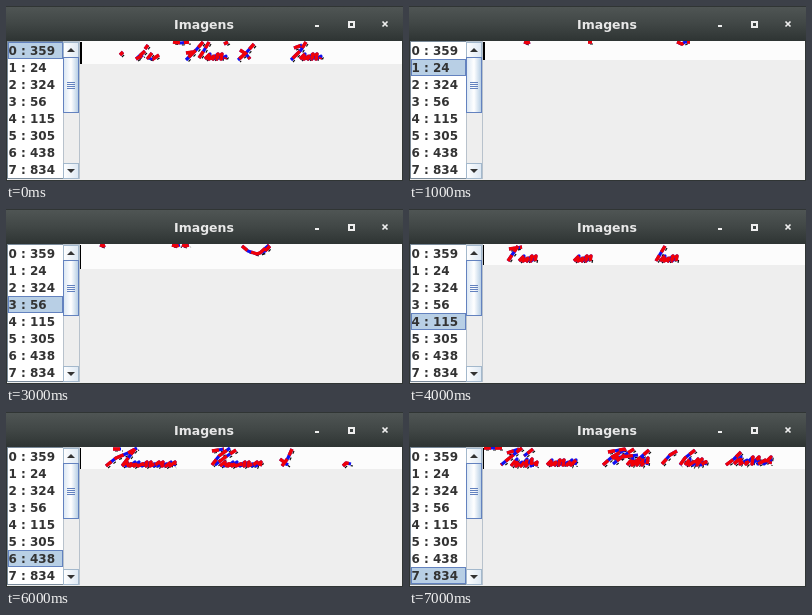
Animation of 397 by 175 pixels, one loop 8000 ms. Source, as an HTML page with a canvas:

```html
<!DOCTYPE html>
<html lang="pt">
<head>
<meta charset="utf-8">
<title>Imagens</title>
<style>
html, body { margin: 0; width: 100%; height: 100%; overflow: hidden; background: #eee; }
canvas { display: block; }
</style>
</head>
<body>
<canvas id="stage" width="397" height="175"></canvas>
<script>
const ctx = document.getElementById('stage').getContext('2d');
const counts = [359, 24, 324, 56, 115, 305, 438, 834];
const ROW = 17, TOP = 36, STEP_MS = 1000;

// A run of small handwritten letters: a slanted zigzag from x0 to x1.
function scribble(x0, x1, y, height = 5, step = 5) {
  let path = `M${x0} ${y}`;
  for (let x = x0, i = 0; x < x1 - step; x += step, i++) {
    const rise = height * (i % 3 === 1 ? .55 : 1);
    path += `l${step} ${-rise}l-1 ${rise}`;
  }
  return path;
}

// Bottom edge, width of the left rule, and the pen strokes of each strip.
const strips = [
  { bottom: 58, rule: 2, ink:
    'M114 49l3-3M142 39l-3 4M139 45l-9 8M130 53l7-4M146 47l-4 5 5 1 6-4' +
    'M167 36l8 1 8-1M197 36l-7 8-10 10M180 47l7-1M203 36l-6 10-4 6' +
    scribble(199, 228, 53) + 'M222 36l-4 2M248 38l-8 9-8 7M234 44l6 4 4 5' +
    'M300 36l-5 8-10 10M288 42l8-3' + scribble(294, 324, 53, 5) },
  { bottom: 54, rule: 2, ink: 'M115 36l3 1 3-1M179 36h4M268 36l5 2 3-2h5' },
  { bottom: 58, rule: 1, ink:
    'M96 53l10-10 8-6M101 43l14-2' + scribble(112, 145, 53) +
    'M178 38l-14 15' + scribble(172, 207, 53) + 'M246 37l-12 16' + scribble(239, 284, 53) },
  { bottom: 60, rule: 1, ink:
    'M94 36l3 1 2-1M166 36l4 1 4-1M176 36l3 1 4-1M236 37l6 5 9 3 8-3 5-5M254 44l9-8' },
  { bottom: 56, rule: 1, ink:
    'M109 37l-10 15M100 40l13-2' + scribble(110, 132, 52) + scribble(165, 190, 52) +
    'M256 37l-9 15' + scribble(251, 274, 52) },
  { bottom: 54, rule: 1, ink:
    'M99 45l3-5 8-2 13-1M113 39l-8 7-7 6M99 47l11-1M137 40l-7 5-9 7M127 46l9 5' +
    'M150 41l-6 6M139 51l7-3M160 49l7-4M179 39l-8 6-9 6M171 47l9 3' +
    'M195 50l17-1M223 37l-6 7-8 8M202 44l9-4' + scribble(218, 280, 51, 7, 6) },
  { bottom: 57, rule: 1, ink:
    'M100 54l10-8 12-5 9-5M107 37h8M129 37l-6 8-7 9' + scribble(116, 182, 54, 4) +
    'M206 53l7-9 11-8M206 39l12-2M230 38l-12 8-9 7' + scribble(214, 266, 54, 4) +
    'M286 37l-4 9-6 8M274 47l8 6M337 54l3-3 5 1' },
  { bottom: 57, rule: 1, ink:
    'M75 36h18M113 36l-10 8-11 9M98 41l12-4M124 37l-9 7' + scribble(102, 136, 54, 7, 6) +
    scribble(138, 175, 53, 5) + 'M194 53l9-8 14-8M199 40l17-3M225 37l-11 7-10 8M240 38l-16 14' +
    'M203 46l26-3' + scribble(218, 248, 53, 7, 6) + 'M253 52l8-9 7-4M286 38l-10 8-5 7' +
    scribble(276, 302, 53, 6) + 'M332 40l-7 7-8 6' + scribble(325, 371, 52, 7, 7) }
];
strips.forEach(strip => strip.path = new Path2D(strip.ink));

function rect(x, y, w, h, fill, border) {
  ctx.fillStyle = border || fill;
  ctx.fillRect(x, y, w, h);
  if (border) {
    ctx.fillStyle = fill;
    ctx.fillRect(x + 1, y + 1, w - 2, h - 2);
  }
}

function gradient(x0, y0, x1, y1, ...colors) {
  const g = ctx.createLinearGradient(x0, y0, x1, y1);
  colors.forEach((c, i) => g.addColorStop(i / (colors.length - 1), c));
  return g;
}

function stroke(path, color, width, dash = []) {
  ctx.strokeStyle = color;
  ctx.lineWidth = width;
  ctx.setLineDash(dash);
  ctx.stroke(path);
}

function drawTitleBar() {
  rect(0, 0, 397, 35, gradient(0, 0, 0, 35, '#505655', '#414746', '#2e3433'));
  rect(0, 0, 397, 1, '#303534');
  ctx.fillStyle = '#e8e8e8';
  ctx.font = 'bold 12.5px "DejaVu Sans", sans-serif';
  ctx.textAlign = 'center';
  ctx.fillText('Imagens', 198, 23);
  rect(309, 19, 4, 2, '#eee');
  rect(342, 15, 7, 7, '#eee');
  rect(344, 17, 3, 3, '#3c4241');
  stroke(new Path2D('M376.5 15.5l5 5m0-5l-5 5'), '#eee', 1.7);
}

function drawArrow(y, direction) {
  rect(57, y, 16, 16, gradient(57, 0, 73, 0, '#fff', '#dde8f3'), '#a3b8cc');
  ctx.fillStyle = '#333';
  ctx.fill(new Path2D(`M61 ${y + 8 - 2 * direction}h8l-4 ${4 * direction}z`));
}

function drawScrollBar() {
  rect(57, 35, 17, 138, '#eee', '#b8c2cc');
  drawArrow(36, -1);
  drawArrow(157, 1);
  rect(57, 51, 16, 56, gradient(58, 0, 72, 0, '#dce8f4', '#fff', '#b8cfe5'), '#6382bf');
  for (let y = 76; y < 83; y += 2) rect(61, y, 8, 1, '#6382bf');
}

function drawList(selected) {
  rect(1, 35, 57, 138, '#fff', '#7a8a99');
  ctx.font = 'bold 12px "DejaVu Sans", sans-serif';
  ctx.textAlign = 'left';
  counts.forEach((count, i) => {
    const y = TOP + i * ROW;
    if (i === selected) rect(2, y, 55, ROW, '#b8cfe5', '#6382bf');
    ctx.fillStyle = '#333';
    ctx.fillText(`${i} : ${count}`, 2.5, y + 13);
  });
}

function drawStrip({ bottom, rule, path }) {
  rect(74, 35, 322, bottom - 35, '#fcfcfc');
  ctx.save();
  ctx.beginPath();
  ctx.rect(74, 35, 322, bottom - 35);
  ctx.clip();
  ctx.save();
  ctx.translate(2, 2);
  stroke(path, '#111', 1.2, [3, 4]);
  ctx.restore();
  ctx.lineJoin = 'round';
  stroke(path, '#1010f0', 3.2);
  stroke(path, '#f00008', 3.4, [7, 4, 10, 5]);
  ctx.restore();
  rect(74, 36, rule, bottom - 36, '#000');
}

function draw(now) {
  const selected = Math.floor(now / STEP_MS) % counts.length;
  rect(0, 0, 397, 175, '#eee', '#303534');
  drawTitleBar();
  drawList(selected);
  drawScrollBar();
  drawStrip(strips[selected]);
}

const start = performance.now();
function tick() {
  draw(performance.now() - start);
  requestAnimationFrame(tick);
}
tick();
</script>
</body>
</html>
```
